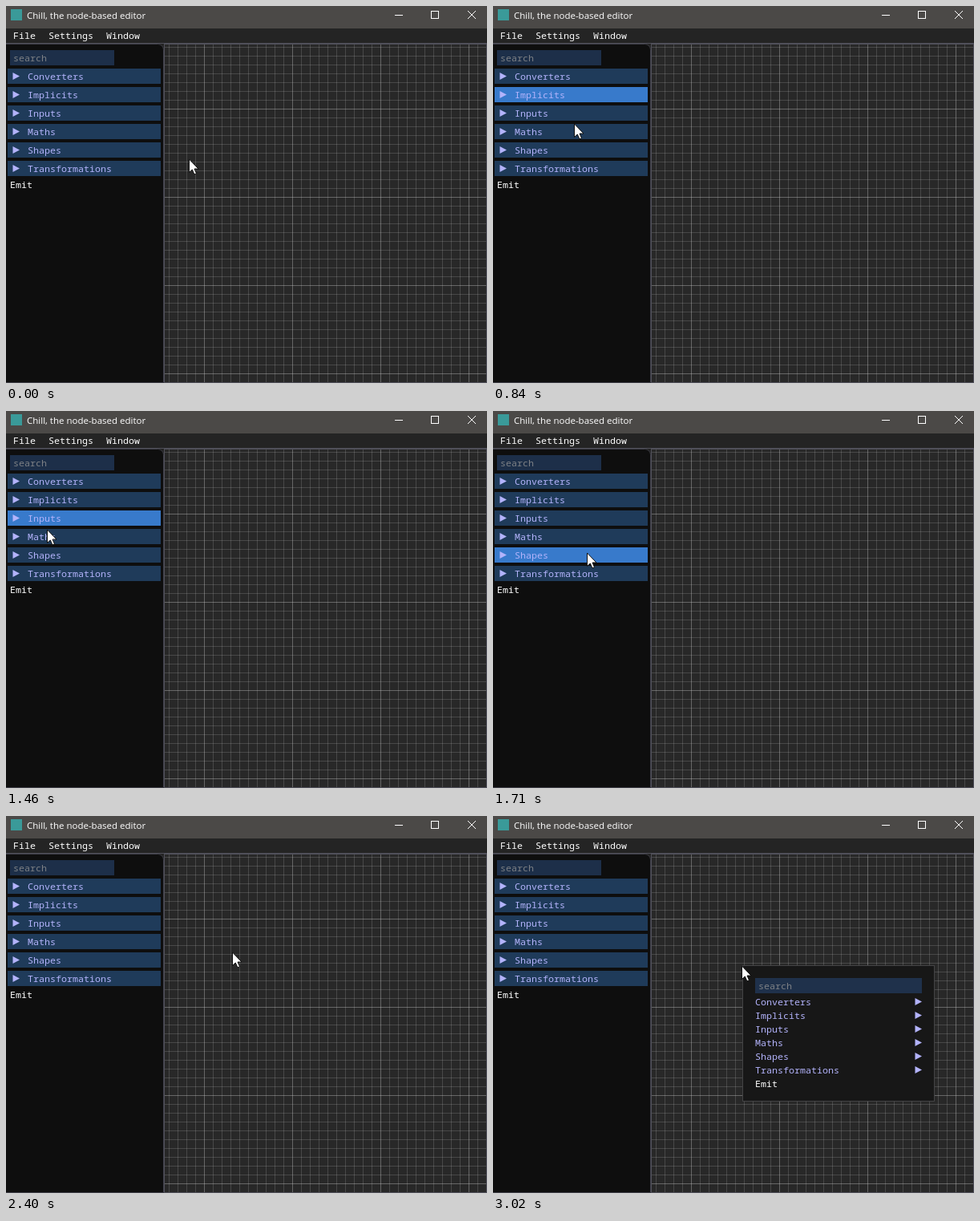
Recreate the animation shown at these times as an HTML page with a canvas. Size 600 by 470 pixels, loop 4110 ms.

```html
<!DOCTYPE html>
<html lang="en">
<head>
<meta charset="utf-8">
<title>Node editor</title>
<style>
  html, body { margin: 0; width: 100%; height: 100%; overflow: hidden; background: #242424; }
  canvas { display: block; }
</style>
</head>
<body>
<canvas id="stage" width="600" height="470"></canvas>
<script>
const ctx = document.getElementById('stage').getContext('2d');
const LOOP = 4110, START = 452, STEP = 77.5, MENU_STEP = 33;
const MONO = '11.667px "Noto Sans Mono", "DejaVu Sans Mono", monospace';
const SANS = '11.5px "Open Sans", "Noto Sans", sans-serif';
const LAVENDER = '#b3b3fb', DIM = '#7d8085', BORDER = '#50505a';
const groups = ['Converters', 'Implicits', 'Inputs', 'Maths', 'Shapes', 'Transformations'];

// Key points of the mouse path: step, x, y
const path = [
  [-1, 229, 191], [2, 144, 106], [4, 95, 98], [6, 110, 188], [8, 75, 110],
  [10, 57, 106], [13, 52, 148], [17, 128, 180], [20, 128, 180], [21, 129, 177],
  [23, 214, 145], [25, 283, 170], [26, 300, 202], [27, 308, 184], [28, 311, 187]
];

// Slope of one axis at key k; zero at the ends and around a rest
function slope(k, axis) {
  const a = path[k - 1], b = path[k], c = path[k + 1];
  if (!a || !c || a[axis] === b[axis] || b[axis] === c[axis]) return 0;
  return (c[axis] - a[axis]) / (c[0] - a[0]);
}

// Smooth cubic curve through the key points
function mouseAt(step) {
  const n = Math.min(Math.max(step, -1), 28);
  const k = Math.min(path.findLastIndex(p => p[0] <= n), path.length - 2);
  const a = path[k], b = path[k + 1], span = b[0] - a[0], u = (n - a[0]) / span;
  const ease = u * u * (3 - 2 * u);
  return [1, 2].map(axis => a[axis] + (b[axis] - a[axis]) * ease + span * u * (1 - u) *
    (slope(k, axis) * (1 - u) - slope(k + 1, axis) * u));
}

function box(x, y, w, h, color) {
  ctx.fillStyle = color;
  ctx.fillRect(x, y, w, h);
}

function frame(x, y, w, h, color) {
  ctx.strokeStyle = color;
  ctx.lineWidth = 1;
  ctx.strokeRect(x + .5, y + .5, w - 1, h - 1);
}

function text(str, x, y, color = '#fff', font = MONO) {
  ctx.font = font;
  ctx.fillStyle = color;
  ctx.fillText(str, x, y);
}

function shape(points, fill, stroke) {
  ctx.beginPath();
  points.forEach(([x, y]) => ctx.lineTo(x, y));
  ctx.closePath();
  ctx.fillStyle = fill;
  ctx.fill();
  if (stroke) {
    ctx.strokeStyle = stroke;
    ctx.stroke();
  }
}

function arrow(x, y) {
  shape([[x, y - 4.5], [x + 8.5, y], [x, y + 4.5]], LAVENDER);
}

function titleBar() {
  box(0, 0, 600, 28, '#4b4947');
  box(6, 4, 14, 14, '#3a9a99');
  text('Chill, the node-based editor', 26, 16, '#fff', SANS);
  box(485, 11, 10, 1, '#fff');
  frame(530, 6, 10, 10, '#fff');
  ctx.beginPath();
  ctx.moveTo(576, 6);
  ctx.lineTo(586, 16);
  ctx.moveTo(586, 6);
  ctx.lineTo(576, 16);
  ctx.stroke();
}

function menuBar() {
  box(0, 28, 600, 18, '#242424');
  box(0, 46, 600, 1, BORDER);
  text('File', 9, 41);
  text('Settings', 53, 41);
  text('Window', 125, 41);
}

function grid() {
  box(197, 47, 403, 423, '#282828');
  const minor = 'rgba(200,200,200,.2)', major = 'rgba(200,200,200,.24)';
  for (let x = 203; x < 600; x += 11) {
    box(x, 47, 1, 423, minor);
    if ((x - 247) % 110 === 0) box(x, 47, 1, 423, major);
  }
  for (let y = 51; y < 470; y += 11) {
    box(197, y, 403, 1, minor);
    if ((y - 128) % 110 === 0) box(197, y, 403, 1, major);
  }
  frame(197, 47, 403, 423, BORDER);
}

function sidePanel(hovered) {
  ctx.beginPath();
  ctx.roundRect(-.5, 47.5, 197, 422, [0, 7, 0, 0]);
  ctx.fillStyle = '#0e0e0e';
  ctx.fill();
  ctx.strokeStyle = '#3e3e47';
  ctx.lineWidth = 1;
  ctx.stroke();
  box(5, 55, 130, 19, '#1d2f49');
  text('search', 9, 69, DIM);
  groups.forEach((name, i) => {
    const y = 78 + 23 * i;
    box(2, y, 191, 19, i === hovered ? '#387acb' : '#1f3b5a');
    arrow(8.5, y + 9.5);
    text(name, 27, y + 14, LAVENDER);
  });
  text('Emit', 5, 227);
}

function popup() {
  box(311, 186, 240, 170, '#171717');
  frame(311, 186, 240, 170, '#434345');
  box(327, 202, 208, 19, '#1f314b');
  text('search', 331, 216, DIM);
  groups.forEach((name, i) => {
    text(name, 327, 236 + 17 * i, LAVENDER);
    arrow(526.5, 231.5 + 17 * i);
  });
  text('Emit', 327, 338);
}

function pointer([x, y]) {
  const outline = [[0, 0], [0, 16.5], [3.8, 13], [6.4, 18.8], [9, 17.7], [6.5, 12], [11.5, 12]];
  ctx.lineWidth = 1;
  shape(outline.map(([px, py]) => [x + px - .5, y + py]), '#fff', '#111');
}

function rowAt([x, y]) {
  const row = Math.floor((y - 78) / 23);
  return x < 193 && y - 78 - 23 * row < 20 ? row : -1;
}

function draw(t) {
  const step = Math.floor((t - START) / STEP);
  box(0, 0, 600, 470, '#242424');
  titleBar();
  menuBar();
  grid();
  // The highlight trails half a step behind the pointer
  sidePanel(rowAt(mouseAt(step - .5)));
  if (step >= MENU_STEP) popup();
  pointer(mouseAt(step).map(Math.round));
}

const start = performance.now();
function tick() {
  draw((performance.now() - start) % LOOP);
  requestAnimationFrame(tick);
}
tick();
</script>
</body>
</html>
```
